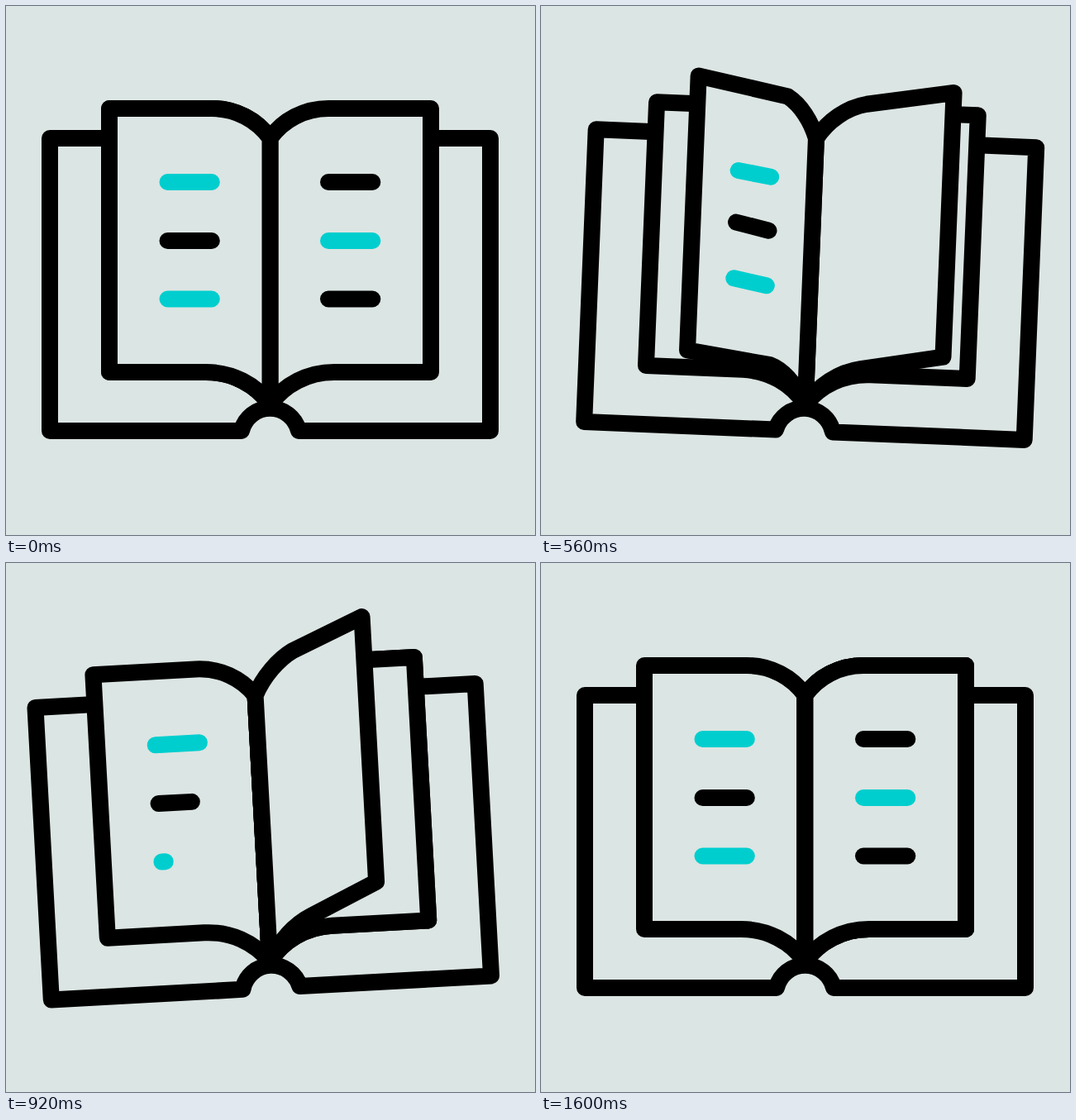
An HTML page for the animation above (2 s loop, 640x640 px).

```html
<!DOCTYPE html>
<html lang="en">
<head>
<meta charset="utf-8">
<title>Open book</title>
<style>
  html, body { margin: 0; width: 100%; height: 100%; overflow: hidden; background: #dbe5e3; }
  svg { display: block; width: 100%; height: 100%; }
  path { fill: none; stroke: #000; stroke-width: 20; stroke-linecap: round; stroke-linejoin: round; }
  .paper { fill: #dbe5e3; }
  .sheet { fill: #dbe5e3; stroke: none; }
</style>
</head>
<body>
<svg viewBox="0 0 640 640">
  <g id="book">
    <path d="M125 160H53V514H285A35.5 35.5 0 0 1 354 514H586V160H514"/>
    <path class="paper" id="left"/>
    <path class="paper" id="right"/>
    <g id="oldRight"></g>
    <path class="paper" id="page1"/>
    <g id="newLeft"></g>
    <path class="sheet" id="fill2"/>
    <g id="oldLeft"></g>
    <path id="page2"/>
    <g id="newRight"></g>
  </g>
</svg>
<script>
const LOOP = 2000, STEP = 40, MID = 319.5, DELAY = 400;
const CYAN = '#00cece', BLACK = '#000';
const ROWS = [213, 284, 354.5];
const $ = id => document.getElementById(id);
const clamp = v => Math.max(0, Math.min(1, v));
const smooth = v => { v = clamp(v); return v * v * (3 - 2 * v); };
const mix = (a, b, k) => a + (b - a) * k;

// Pose: top corner, knee, two handles; then the same for the bottom edge.
const flatLeft = [125, 124, 249, 124, 278, 124, 304, 138, 125, 443, 242, 443, 274, 443, 302, 458];
const lifted = [188, 80.5, 293, 107, 305, 119, 315, 140, 188, 416.6, 284, 434, 299, 442, 309, 460];
const upright = [331, 45, 320, 112, 318.5, 127, 319.5, 143, 331, 374, 321, 424, 320, 437, 319.5, 460];
const falling = [453.5, 71.8, 368, 108, 349, 118, 330, 138, 453.5, 392.8, 372, 430, 350, 440, 332, 460];
const flatRight = flatLeft.map((v, i) => i % 2 ? v : 2 * MID - v);
const poses = [flatLeft, lifted, upright, falling, flatRight];
const times = [40, 180, 360, 520, 600];

function poseAt(t) {
  if (t <= times[0]) return flatLeft;
  if (t >= times[4]) return flatRight;
  const i = times.findIndex(v => v > t) - 1;
  let k = (t - times[i]) / (times[i + 1] - times[i]);
  if (i === 0) k = Math.pow(k, 1.6);
  return poses[i].map((v, j) => mix(v, poses[i + 1][j], k));
}

function outline(p) {
  const at = i => p[i].toFixed(2) + ' ' + p[i + 1].toFixed(2);
  return `M${at(0)}L${at(2)}C${at(4)} ${at(6)} ${MID} 160V482` +
    `C${at(14)} ${at(12)} ${at(10)}L${at(8)}Z`;
}

function addLines(id, colors) {
  return colors.map(color => {
    const line = document.createElementNS('http://www.w3.org/2000/svg', 'path');
    line.style.stroke = color;
    $(id).append(line);
    return line;
  });
}

const show = (el, on) => el.setAttribute('visibility', on ? 'visible' : 'hidden');
const segment = (x1, y1, x2, y2) => `M${x1} ${y1}L${x2} ${y2}`;
const leftColors = [CYAN, BLACK, CYAN], rightColors = [BLACK, CYAN, BLACK];
const oldLeft = addLines('oldLeft', leftColors);
const newLeft = addLines('newLeft', leftColors);
const oldRight = addLines('oldRight', rightColors);
const newRight = addLines('newRight', rightColors);

$('left').setAttribute('d', outline(flatLeft));
$('right').setAttribute('d', outline(flatRight));
oldRight.forEach((el, i) => el.setAttribute('d', segment(390, ROWS[i], 443.3, ROWS[i])));

function grow(lines, x, t, start, gap) {
  lines.forEach((el, i) => {
    const k = (t - start - i * gap) / 240;
    show(el, k > 0);
    el.setAttribute('d', segment(x, ROWS[i], x + 0.01 + 53.3 * smooth(k), ROWS[i]));
  });
}

// Lines printed on the second page shrink and rise with it.
const rise = [[17, 7], [30.6, 16.7], [35, 23]];
function carry(p) {
  const edge = (p[0] - MID) / (125 - MID), lift = (124 - p[1]) / 55.3;
  oldLeft.forEach((el, i) => {
    show(el, edge > 0.1);
    el.setAttribute('d', segment(
      MID - 124 * edge, ROWS[i] - rise[i][0] * lift,
      MID - 70.7 * edge, ROWS[i] - rise[i][1] * lift));
  });
}

function tilt(t) {
  if (t < 640) return 3 * smooth((t - 374) / 266);
  if (t < 918) return mix(3, -3.13, smooth((t - 640) / 278));
  return mix(-3.13, 0, smooth((t - 918) / 280));
}

function draw(t) {
  const second = poseAt(t - DELAY), turning = t > times[0] + DELAY;
  $('book').setAttribute('transform', `rotate(${tilt(t).toFixed(3)} ${MID} 488)`);
  $('page1').setAttribute('d', outline(poseAt(t)));
  for (const id of ['fill2', 'page2']) {
    $(id).setAttribute('d', outline(second));
    show($(id), turning);
  }
  carry(second);
  grow(newLeft, 195.5, t, 636, 121);
  grow(newRight, 390, t, 1016, 165);
}

function frame(now) {
  draw(Math.floor(now % LOOP / STEP) * STEP);
  requestAnimationFrame(frame);
}
draw(0);
requestAnimationFrame(frame);
</script>
</body>
</html>
```
